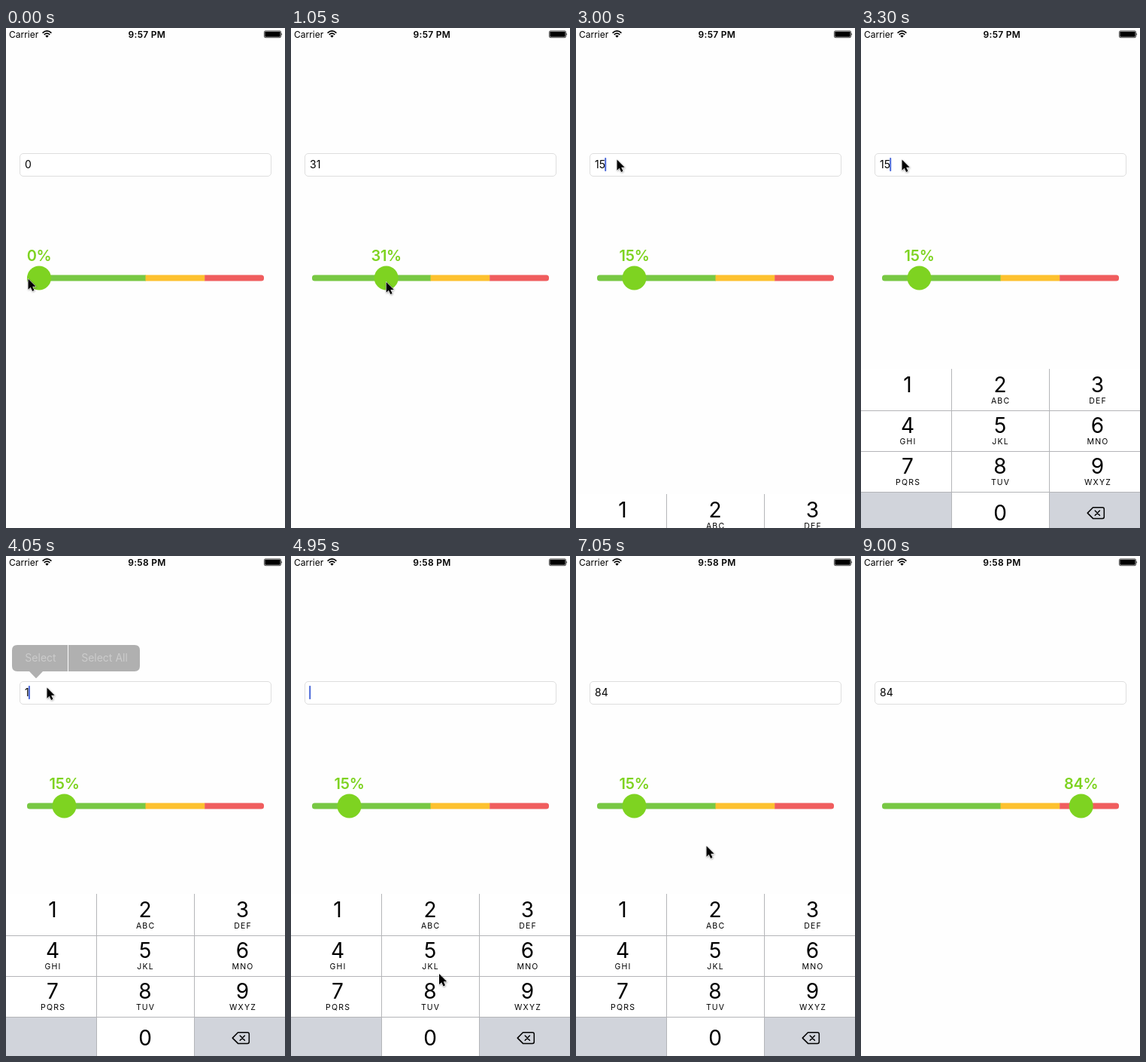
Animation of 371x663 px, one loop 9300 ms. Source, as an HTML page:

```html
<!DOCTYPE html>
<html lang="en">
<head>
<meta charset="utf-8">
<style>
  html, body { margin: 0; width: 100%; height: 100%; overflow: hidden; background: #fefefe; }
  svg { display: block; width: 371px; height: 663px; font-family: Inter, Roboto, sans-serif; }
  .mid { text-anchor: middle; }
  .line { fill: none; stroke: #b4b5b8; }
</style>
</head>
<body>
<svg viewBox="0 0 371 663">
  <defs>
    <clipPath id="round"><rect x="28" y="327.5" width="315" height="8" rx="3.5"/></clipPath>
    <filter id="shade" x="-50%" y="-50%" width="200%" height="200%">
      <feDropShadow dx="0.5" dy="1" stdDeviation="0.8" flood-opacity="0.4"/>
    </filter>
  </defs>
  <rect width="371" height="663" fill="#fefefe"/>

  <g id="status">
    <text x="4" y="13" font-size="12">Carrier</text>
    <g fill="none" stroke="#000" stroke-width="1.7">
      <path d="M48.6 6.6Q54.5 1.2 60.4 6.6"/>
      <path d="M50.7 8.9Q54.5 5.5 58.3 8.9"/>
    </g>
    <path d="M52.3 10.5Q54.5 8.7 56.7 10.5L54.5 12.8Z"/>
    <text id="clock" class="mid" x="187.4" y="13" font-size="12" font-weight="600" letter-spacing="0.3"></text>
    <rect x="343.4" y="3.9" width="22.2" height="8.8" rx="1.6" fill="none" stroke="#000" stroke-width="0.7"/>
    <rect x="344.3" y="4.8" width="20.4" height="7" rx="0.8"/>
    <path d="M366.4 6.6Q368 8.3 366.4 10Z"/>
  </g>

  <rect x="18.5" y="166.5" width="334" height="30" rx="4.5" fill="#fff" stroke="#dedede"/>
  <text id="field" x="25" y="186" font-size="14"></text>
  <rect id="caret" y="172" width="2" height="18" rx="0.8" fill="#4a68d8"/>

  <g clip-path="url(#round)">
    <rect x="28" y="327" width="158" height="9" fill="#78c843"/>
    <rect x="185.5" y="327" width="79" height="9" fill="#fdc12e"/>
    <rect x="264.2" y="327" width="79" height="9" fill="#f05d5e"/>
  </g>
  <g id="thumb" fill="#7ed321">
    <circle cy="331.5" r="16"/>
    <text id="percent" class="mid" y="308.5" font-size="20" font-weight="600" letter-spacing="-0.3"></text>
  </g>

  <g id="menu">
    <g fill="#1f1f1f">
      <path d="M82 118H15Q8 118 8 125V146Q8 153 15 153H31L40 162.3L49 153H82Z"/>
      <path d="M83 118H171Q178 118 178 125V146Q178 153 171 153H83Z"/>
    </g>
    <g fill="#fff" class="mid" font-size="14">
      <text x="46" y="140">Select</text>
      <text x="131" y="140">Select All</text>
    </g>
  </g>

  <g id="pad">
    <rect width="371" height="215" fill="#fff"/>
    <rect id="pressed" y="55" width="120" height="54" fill="#d1d4db"/>
    <path d="M0 163H120V215H0ZM251 163H371V215H251Z" fill="#d1d4db"/>
    <path class="line" d="M120.5 0V215M250.5 0V215M0 55.5H371M0 109.5H371M0 163.5H371"/>
    <g id="keys" class="mid"></g>
    <g fill="none" stroke="#000" stroke-width="1.5" stroke-linejoin="round" stroke-linecap="round">
      <path d="M308.5 183.8H321Q323.3 183.8 323.3 186V196.2Q323.3 198.4 321 198.4H308.5L301.2 191.1Z"/>
      <path d="M311.2 188L317.4 194.2M317.4 188L311.2 194.2"/>
    </g>
  </g>

  <path id="cursor" d="M0 0V14.2L3.2 11.2L5.6 16.4L8 15.3L5.7 10.3H10.2Z" stroke="#fff" stroke-width="1" paint-order="stroke" filter="url(#shade)"/>
</svg>
<script>
const LOOP = 9300, STEP = 150;
const $ = id => document.getElementById(id);
const set = (id, attrs) => { for (const k in attrs) $(id).setAttribute(k, attrs[k]); };
const show = (id, on) => $(id).setAttribute('visibility', on ? 'visible' : 'hidden');
const clamp = (v, lo, hi) => Math.min(hi, Math.max(lo, v));

// pointer track: time, x, y
const track = [
  [0, 29.5, 332.5], [150, 32, 333], [300, 32, 333], [450, 46, 334], [1350, 167, 338],
  [1800, 77.5, 346], [2250, 47, 155], [2400, 47, 155], [2700, 54.5, 174.5], [4500, 54.5, 174.5],
  [4950, 197, 554], [5100, 197, 554], [5400, 190, 573], [5550, 190, 573], [6150, 85.5, 523],
  [6300, 66, 526], [6600, 184, 384], [7050, 173.5, 384.5], [LOOP, 173.5, 384.5]
];
const typed = [[3000, '15'], [4050, '1'], [4200, ''], [5400, '8'], [6450, '84']];
const blink = [[3000, 1], [4650, 0], [4950, 1], [6900, 0]];

const letters = ['', 'ABC', 'DEF', 'GHI', 'JKL', 'MNO', 'PQRS', 'TUV', 'WXYZ'];
const cols = [62, 185, 314.5];
const label = (x, y, size, text, gap = 0) =>
  `<text x="${x + gap / 2}" y="${y}" font-size="${size}" letter-spacing="${gap}">${text}</text>`;
$('keys').innerHTML = letters.map((s, i) => {
  const x = cols[i % 3], y = Math.floor(i / 3) * 54;
  return label(x, y + 31, 28, i + 1) + label(x, y + 46, 10.5, s, 1.2);
}).join('') + label(185, 200.5, 28, 0);

function pointer(t) {
  const i = track.findIndex(k => k[0] > t);
  const [a, x, y] = track[i - 1], [b, u, v] = track[i];
  const p = (t - a) / (b - a);
  return [x + (u - x) * p, y + (v - y) * p];
}

const latest = (list, t) => list.reduce((v, k) => t >= k[0] ? k[1] : v, null);

// share of the way left for a critically damped spring
const spring = ms => ms <= 0 ? 1 : (1 + 0.017 * ms) * Math.exp(-0.017 * ms);

function draw(time) {
  const t = Math.floor((time % LOOP) / STEP) * STEP;
  const [px, py] = pointer(t);
  set('cursor', { transform: `translate(${px} ${py})` });
  show('cursor', t < 8400);

  const x = t < 450 ? 28 : t >= 7650 ? 292.7 : t < 1800 ? px : 77.5;
  const value = Math.floor((x - 28) / 3.15);
  set('thumb', { transform: `translate(${clamp(x, 44, 327)} 0)` });
  $('percent').textContent = value + '%';

  $('clock').textContent = t < 4050 ? '9:57 PM' : '9:58 PM';
  $('field').textContent = t < 3000 ? value : latest(typed, t);
  set('caret', { x: 25 + $('field').getComputedTextLength() - 0.8 });
  show('caret', latest(blink, t));

  const menu = t < 3600 || t >= 4200 ? 0 : t === 3600 ? 0.5 : t === 4050 ? 0.35 : 1;
  set('menu', { 'fill-opacity': menu });

  const hide = 1 - spring(t - 7520);
  const drop = t < 7650 ? spring(t - 2950) : hide;
  set('pad', { transform: `translate(0 ${448 + Math.round(215 * drop)})` });
  show('pad', t >= 3000 && t < 7800);
  set('pressed', { 'fill-opacity': t === 6300 ? 1 : 0 });
}

const start = performance.now();
function tick() {
  draw(performance.now() - start);
  requestAnimationFrame(tick);
}
tick();
</script>
</body>
</html>
```
